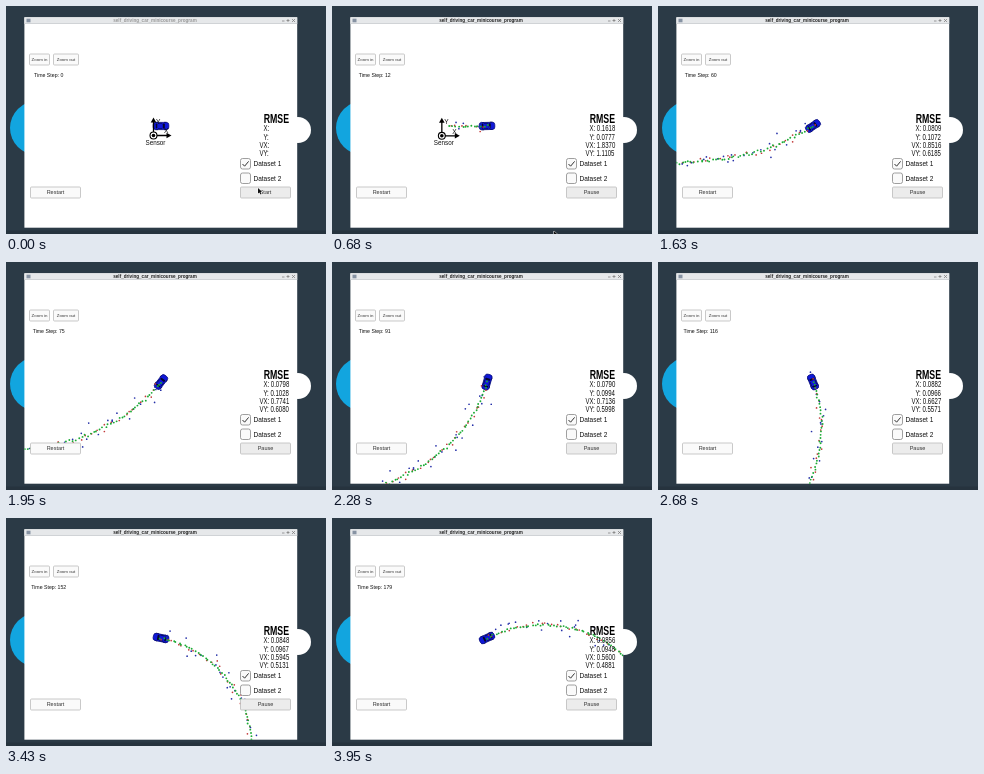
An HTML page with a canvas for the animation above (3990 ms loop, 320 px wide and 228 px high).

```html
<!DOCTYPE html>
<html lang="en">
<head>
<meta charset="utf-8">
<title>Tracking simulator</title>
<style>
html, body { margin: 0; width: 100%; height: 100%; overflow: hidden; background: #2b3a46; }
canvas { display: block; }
</style>
</head>
<body>
<canvas id="stage" width="320" height="228"></canvas>
<script>
const ctx = document.getElementById('stage').getContext('2d');
const LOOP = 3990, CLICK = 440, LAST = 182;
const FONT = '"Liberation Sans", Arial, sans-serif';
const CAR = { x: 155, y: 120 };

// [time in ms, step]
const CLOCK = [[CLICK, 0], [680, 12], [1630, 60], [2280, 91], [2680, 116], [3430, 152], [3950, 179], [LOOP, 181]];
// [step, X, Y, VX, VY]
const ERRORS = [
  [1, 0.09, 0.06, 2.9, 1.3],
  [12, 0.1618, 0.0777, 1.8370, 1.1105],
  [60, 0.0809, 0.1072, 0.8516, 0.6185],
  [91, 0.0790, 0.0994, 0.7136, 0.5998],
  [116, 0.0882, 0.0966, 0.6627, 0.5571],
  [152, 0.0848, 0.0967, 0.5945, 0.5131],
  [179, 0.0856, 0.0948, 0.5600, 0.4881],
  [LAST, 0.0856, 0.0946, 0.5570, 0.4860]
];

function lookup(keys, at, col, ease = v => v) {
  if (at <= keys[0][0]) return keys[0][col];
  const i = keys.findIndex(k => k[0] >= at);
  if (i < 0) return keys[keys.length - 1][col];
  const [a, b] = [keys[i - 1], keys[i]];
  const f = (ease(at) - ease(a[0])) / (ease(b[0]) - ease(a[0]));
  return a[col] + (b[col] - a[col]) * f;
}

let seed = 7;
function random() {
  seed = (seed * 16807) % 2147483647;
  return seed / 2147483647;
}
const gauss = () => (random() + random() + random() + random() - 2) * 1.73;

// World coordinates: pixels from the sensor, y up.
const yaw = s => 2.2 * (1 - Math.cos(Math.PI * s / 250));
const speed = s => 3.23 + 0.16 * Math.cos((s - 88) / 20);

const track = [];
for (let s = 0, x = 7.5, y = 9.5; s <= LAST; s++) {
  const range = Math.hypot(x, y) + gauss() * 3.6;
  const angle = Math.atan2(y, x) + gauss() * 0.03;
  const radar = s % 2 === 1;
  track.push({
    x, y, radar,
    mx: radar ? range * Math.cos(angle) : x + gauss() * 1.8,
    my: radar ? range * Math.sin(angle) : y + gauss() * 1.8,
    ex: x + gauss() * 0.6,
    ey: y + gauss() * 0.6
  });
  const v = speed(s + 0.5), a = yaw(s + 0.5);
  x += v * Math.cos(a);
  y += v * Math.sin(a);
}

function rect(x, y, w, h, color) {
  ctx.fillStyle = color;
  ctx.fillRect(x, y, w, h);
}

function circle(x, y, r, color) {
  ctx.fillStyle = color;
  ctx.beginPath();
  ctx.arc(x, y, r, 0, 7);
  ctx.fill();
}

function box(x, y, w, h, r, fill, stroke) {
  ctx.beginPath();
  ctx.roundRect(x, y, w, h, r);
  ctx.fillStyle = fill;
  ctx.fill();
  if (stroke) {
    ctx.strokeStyle = stroke;
    ctx.lineWidth = 0.8;
    ctx.stroke();
  }
}

function line(points, width, color) {
  ctx.beginPath();
  points.forEach(p => ctx.lineTo(...p));
  ctx.lineWidth = width;
  ctx.strokeStyle = color;
  ctx.stroke();
}

function shape(points, color) {
  ctx.beginPath();
  points.forEach(p => ctx.lineTo(...p));
  ctx.fillStyle = color;
  ctx.fill();
}

function text(str, x, y, size, { align = 'left', weight = '', color = '#111' } = {}) {
  ctx.font = `${weight} ${size}px ${FONT}`;
  ctx.textAlign = align;
  ctx.textBaseline = 'alphabetic';
  ctx.fillStyle = color;
  ctx.fillText(str, x, y);
}

function button(label, x, y, w, size, fill = '#fafafa') {
  box(x + 0.5, y + 0.5, w - 1, 11, 1, fill, '#bbb');
  text(label, x + w / 2, y + 6 + size * 0.36, size, { align: 'center', color: '#333' });
}

function checkbox(label, y, checked) {
  box(234.5, y + 0.5, 10, 10.5, 2, '#fafafa', '#888');
  if (checked) line([[236.5, y + 6], [238.6, y + 8.2], [242.6, y + 3.4]], 1, '#333');
  text(label, 247.5, y + 8, 6.5);
}

function drawDesktop() {
  rect(0, 0, 320, 228, '#2b3a46');
  rect(0, 224.5, 320, 3.5, '#26333e');
  circle(31, 122, 27, '#12a5df');
  circle(292, 124, 13, '#fff');
}

function drawWindow(focused) {
  rect(18.4, 11.3, 272.8, 210.4, '#fff');
  rect(18.4, 11.3, 272.8, 6.7, '#e6e8ea');
  rect(18.4, 17.5, 272.8, 0.5, '#b9bcc0');
  rect(20.5, 12.7, 4, 3.6, '#8793a3');
  const color = focused ? '#222' : '#999';
  text('self_driving_car_minicourse_program', 149, 16.1, 4.6, { align: 'center', weight: 'bold', color });
  const icon = '#777';
  line([[276, 15], [278.5, 15]], 0.7, icon);
  line([[280.5, 14.5], [283.5, 14.5]], 0.7, icon);
  line([[282, 13], [282, 16]], 0.7, icon);
  line([[286, 13], [289, 16]], 0.7, icon);
  line([[289, 13], [286, 16]], 0.7, icon);
}

function drawSensor() {
  line([[0, 0], [0, -14]], 1.3, '#000');
  line([[0, 0], [14, 0]], 1.3, '#000');
  shape([[-2.8, -13], [0, -18], [2.8, -13]], '#000');
  shape([[13, -2.8], [18, 0], [13, 2.8]], '#000');
  circle(0, 0, 4, '#000');
  circle(0, 0, 2.9, '#fff');
  circle(0, 0, 1.8, '#000');
  text('Y', 2.5, -11.5, 6.6);
  text('X', 10.5, -2.3, 6.6);
  text('Sensor', -8, 9.3, 6.3);
}

function drawCar(angle) {
  ctx.save();
  ctx.translate(CAR.x, CAR.y);
  ctx.rotate(-angle);
  for (const x of [-5.6, 3]) rect(x, -4.1, 2.6, 8.2, '#0a0a30');
  box(-7.8, -3.6, 15.6, 7.2, 2.4, '#1018d8', '#0a0f80');
  box(-5.2, -2.5, 1.5, 5, 0.7, '#05082c');
  box(1.8, -2.6, 2, 5.2, 0.8, '#05082c');
  line([[-3, -2.7], [1.2, -2.7]], 0.6, '#05082c');
  line([[-3, 2.7], [1.2, 2.7]], 0.6, '#05082c');
  ctx.restore();
}

function drawScene(step) {
  const here = track[step];
  const seen = step ? track.slice(0, step + 1) : [];
  ctx.save();
  ctx.beginPath();
  ctx.rect(18.4, 18, 272.8, 203.7);
  ctx.clip();
  drawCar(yaw(step));
  ctx.translate(CAR.x - here.x, CAR.y + here.y);
  drawSensor();
  seen.forEach(p => circle(p.mx, -p.my, 0.85, p.radar ? '#2530a8' : '#c23a3a'));
  seen.forEach(p => circle(p.ex, -p.ey, 0.95, '#1cab35'));
  ctx.restore();
}

function drawErrors(step) {
  ctx.save();
  ctx.translate(253.4, 0);
  ctx.scale(0.72, 1);
  text('RMSE', 6, 117.4, 12.2, { weight: 'bold', color: '#000' });
  ['X', 'Y', 'VX', 'VY'].forEach((name, i) => {
    const value = step ? lookup(ERRORS, step, i + 1, s => 1 / Math.sqrt(s)).toFixed(4) : '';
    text(`${name}: ${value}`, i < 2 ? 5.6 : 0, 125.4 + i * 8.15, 8.4);
  });
  ctx.restore();
}

function drawCursor(t) {
  if (t > 800) return;
  const f = Math.min(1, Math.max(0, (t - CLICK) / 220));
  const x = 252 - 30 * f, y = 182 + 43 * f;
  const tip = [[0, 0], [0, 5.5], [1.4, 4.4], [2.6, 6.6], [3.5, 6.1], [2.5, 4], [4, 3.8], [0, 0]];
  const points = tip.map(p => [x + p[0], y + p[1]]);
  line(points, 1, '#fff');
  shape(points, '#111');
}

function frame() {
  const t = performance.now() % LOOP;
  const step = Math.floor(lookup(CLOCK, t, 1) + 0.01);
  const running = t >= CLICK;
  drawDesktop();
  drawWindow(running);
  drawScene(step);
  button('Zoom in', 23, 47.5, 21, 4.4);
  button('Zoom out', 47, 47.5, 26, 4.4);
  button('Restart', 24, 180.5, 51, 5.5);
  button(running ? 'Pause' : 'Start', 234, 180.5, 51, 5.5, '#ececec');
  text(`Time Step: ${step}`, 42.7, 70.8, 5.2, { align: 'center' });
  checkbox('Dataset 1', 152, true);
  checkbox('Dataset 2', 166.5, false);
  drawErrors(step);
  drawCursor(t);
  requestAnimationFrame(frame);
}
frame();
</script>
</body>
</html>
```
